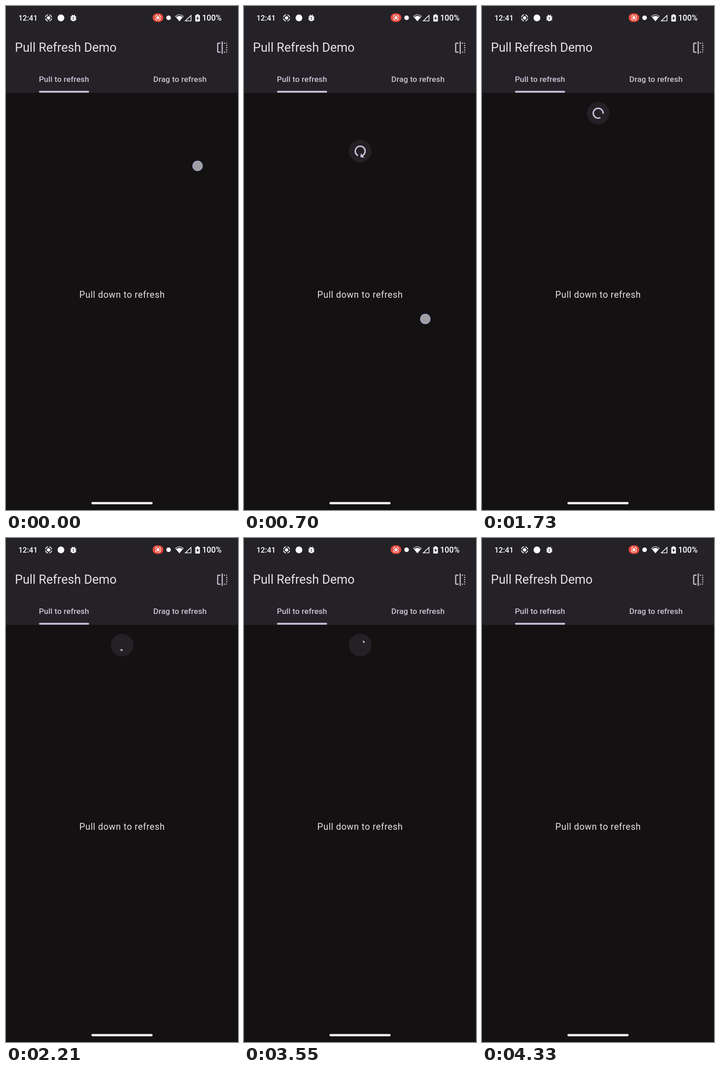
An HTML page for the animation above (4360 ms loop, 508 px wide and 1102 px high).

```html
<!DOCTYPE html>
<html lang="en">
<head>
<meta charset="utf-8">
<title>Pull Refresh Demo</title>
<style>
  html, body { margin: 0; width: 100%; height: 100%; overflow: hidden; background: #131112; }
  svg { display: block; width: 100%; height: 100%; }
  text { font-family: Roboto, sans-serif; }
  .tab { font-size: 17.26px; font-weight: 500; letter-spacing: .12px; text-anchor: middle; }
  .status { font-weight: 500; fill: #fff; }
</style>
</head>
<body>
<svg viewBox="0 0 508 1102">
  <defs>
    <clipPath id="body"><rect y="190" width="508" height="912"/></clipPath>
    <g id="record">
      <circle r="6.9" fill="none" stroke="#fff" stroke-width="1.7" stroke-dasharray="8 2.84" stroke-dashoffset="-1.42"/>
      <circle r="3.7" fill="#fff"/>
    </g>
  </defs>

  <rect width="508" height="1102" fill="#131112"/>
  <rect width="508" height="190" fill="#242227"/>

  <!-- status bar -->
  <text class="status" x="27.2" y="31.6" font-size="16.5">12:41</text>
  <use href="#record" x="93.3" y="26"/>
  <circle cx="120.3" cy="26" r="7.4" fill="#fff"/>
  <path transform="translate(137.8 16.3) scale(.81)" fill="#fff" d="M20 8h-2.81c-.45-.78-1.07-1.45-1.82-1.96L17 4.41 15.59 3l-2.17 2.17a6 6 0 0 0-2.83 0L8.41 3 7 4.41l1.62 1.63C7.88 6.55 7.26 7.22 6.81 8H4v2h2.09L6 11v1H4v2h2v1l.09 1H4v2h2.81a6 6 0 0 0 10.38 0H20v-2h-2.09L18 15v-1h2v-2h-2v-1l-.09-1H20zm-6 8h-4v-2h4zm0-4h-4v-2h4z"/>
  <rect x="321" y="16" width="23.4" height="19" rx="9.5" fill="#e4473b"/>
  <use href="#record" transform="translate(332.7 25.5) scale(.87)"/>
  <circle cx="356" cy="25.7" r="5" fill="#fff"/>
  <path d="M370.3 22.2Q379.7 14.6 389.1 22.2L379.7 33.6Z" fill="#fff"/>
  <path d="M371.8 22.4Q379.7 16.6 387.6 22.4L386.3 24Q379.7 19.4 373.1 24Z" fill="#242227"/>
  <path d="M405.2 20.6V32.6H392.6Z" fill="none" stroke="#fff" stroke-width="1.5"/>
  <path d="M417.4 18h4.2v1.8h1.6q1.3 0 1.3 1.3v11.6q0 1.3-1.3 1.3h-7.4q-1.3 0-1.3-1.3V21.100q0-1.300 1.300-1.300h1.600Z" fill="#fff"/>
  <path d="M420.300 21.800l-3.700 6h2.300v4l3.600-6h-2.200Z" fill="#242227"/>
  <text class="status" x="429.4" y="31.800" font-size="17.500">100%</text>

  <!-- app bar and tabs -->
  <text x="19.600" y="100" font-size="27.100" fill="#e6e1e5">Pull Refresh Demo</text>
  <path transform="translate(458.600 76.300) scale(1.233)" fill="#cac4d0" d="M15 21h2v-2h-2zM19 9h2V7h-2zM3 5v14c0 1.100.9 2 2 2h4v-2H5V5h4V3H5c-1.100 0-2 .9-2 2zM19 3v2h2c0-1.100-.9-2-2-2zM11 23h2V1h-2zM19 17h2v-2h-2zM15 5h2V3h-2zM19 13h2v-2h-2zM19 21c1.100 0 2-.9 2-2h-2z"/>
  <text class="tab" x="127" y="165.700" fill="#cdc5d6">Pull to refresh</text>
  <text class="tab" x="381" y="165.700" fill="#cac4d0">Drag to refresh</text>
  <rect x="72.300" y="185.600" width="109.600" height="4" rx="2" fill="#ccc2dc"/>

  <!-- content -->
  <text x="254.300" y="638" font-size="19.730" letter-spacing=".62" text-anchor="middle" fill="#e6e1e5">Pull down to refresh</text>
  <rect x="187" y="1084.600" width="134" height="5" rx="2.500" fill="#f4f2f4"/>

  <g clip-path="url(#body)">
    <g id="badge">
      <circle r="24.660" fill="#232126"/>
      <g id="arrow" fill="#ccc2dc">
        <path id="arrowArc" fill="none" stroke="#ccc2dc" stroke-width="3.080" stroke-linecap="square"/>
        <path id="arrowHead"/>
      </g>
      <path id="spinner" fill="none" stroke="#ccc2dc" stroke-width="3.080" stroke-linecap="square"/>
    </g>
  </g>
  <circle id="finger" r="10.700" fill="#9f9da1" stroke="#a8b6e4" stroke-width="1.200"/>
</svg>

<script>
const $ = id => document.getElementById(id);
const clamp = (v, lo = 0, hi = 1) => Math.min(hi, Math.max(lo, v));

const LOOP = 4360, RELEASE = 1010, SPIN = 1023, DONE = 4010;
const DP = 508 / 412, TOP = 190, SIZE = 40 * DP;
const THRESHOLD = 80 * DP, REST = 56 * DP, RADIUS = 8.75 * DP;
const START_Y = 349.6, TRAVEL = 334.6, SLOP = 10, LAG = 16;
const ARMED = 325;

// Share of the drag covered at time t
function drag(t) {
  const x = clamp((t - 30) / 484);
  return x * x * (3 - 2 * x);
}

// cubic-bezier(.4, 0, .2, 1), solved by bisection
function ease(x) {
  let lo = 0, hi = 1;
  for (let i = 0; i < 24; i++) {
    const s = (lo + hi) / 2, u = 1 - s;
    if (1.2 * s * u * u + .6 * s * s * u + s ** 3 < x) lo = s; else hi = s;
  }
  return lo * lo * (3 - 2 * lo);
}

// Critically damped spring, remaining share after ms
function spring(ms) {
  const w = Math.sqrt(1500) * ms / 1000;
  return (1 + w) * Math.exp(-w);
}

function arc(start, sweep) {
  const at = deg => {
    const a = deg * Math.PI / 180;
    return `${(RADIUS * Math.cos(a)).toFixed(3)} ${(RADIUS * Math.sin(a)).toFixed(3)}`;
  };
  sweep = Math.max(sweep, .5);
  return `M${at(start)}A${RADIUS} ${RADIUS} 0 ${sweep > 180 ? 1 : 0} 1 ${at(start + sweep)}`;
}

function pull(t) {
  const distance = Math.max(0, drag(t - LAG) * TRAVEL - SLOP);
  const progress = distance / 2 / THRESHOLD;
  const over = clamp(progress - 1, 0, 2);
  const tension = over - over * over / 4;
  return { progress, tension, offset: THRESHOLD * (Math.min(progress, 1) + tension) };
}

function drawArrow({ progress, tension }) {
  const grow = Math.max(Math.min(1, progress) - .4, 0) * 5 / 3;
  const turn = (-.25 + .4 * grow + tension) * 180;
  const sweep = grow * .8 * 360;
  const half = 5 * DP * grow, y = 1.25 * DP;
  $('arrowArc').setAttribute('d', arc(turn, sweep));
  $('arrowHead').setAttribute('d', `M${RADIUS - half} ${y}h${2 * half}l${-half} ${half}Z`);
  $('arrowHead').setAttribute('transform', `rotate(${turn + sweep})`);
}

function drawSpinner(ms) {
  const cycle = Math.floor(ms / 1332), p = ms - cycle * 1332;
  const head = 290 * ease(clamp(p / 666));
  const tail = 290 * ease(clamp((p - 666) / 666));
  const base = -90 + 7.16 + 286 * p / 1332 + 216 * cycle;
  $('spinner').setAttribute('d', arc(base + tail, head - tail));
}

function render(t) {
  const held = t < RELEASE;
  const f = drag(t);
  $('finger').setAttribute('visibility', held ? 'visible' : 'hidden');
  $('finger').setAttribute('transform',
    `translate(${419.5 - 46.7 * f + 24.2 * f * f} ${START_Y + TRAVEL * f})`);

  const state = pull(t);
  let offset = state.offset;
  if (t >= DONE) offset = REST * spring(t - DONE);
  else if (!held) offset = REST + (offset - REST) * spring(t - RELEASE);
  $('badge').setAttribute('transform', `translate(254.4 ${TOP + offset - SIZE / 2})`);

  drawArrow(held ? state : { progress: 0, tension: 0 });
  const armed = .3 + .7 * clamp((t - ARMED) / 300);
  $('arrow').setAttribute('opacity', armed * (1 - clamp((t - RELEASE) / 100)));

  drawSpinner(Math.max(0, t - SPIN));
  const shown = clamp((t - SPIN) / 100) * (1 - clamp((t - DONE) / 100));
  $('spinner').setAttribute('opacity', shown);
}

const begin = performance.now();
function tick() {
  render((performance.now() - begin) % LOOP);
  requestAnimationFrame(tick);
}
tick();
</script>
</body>
</html>
```
